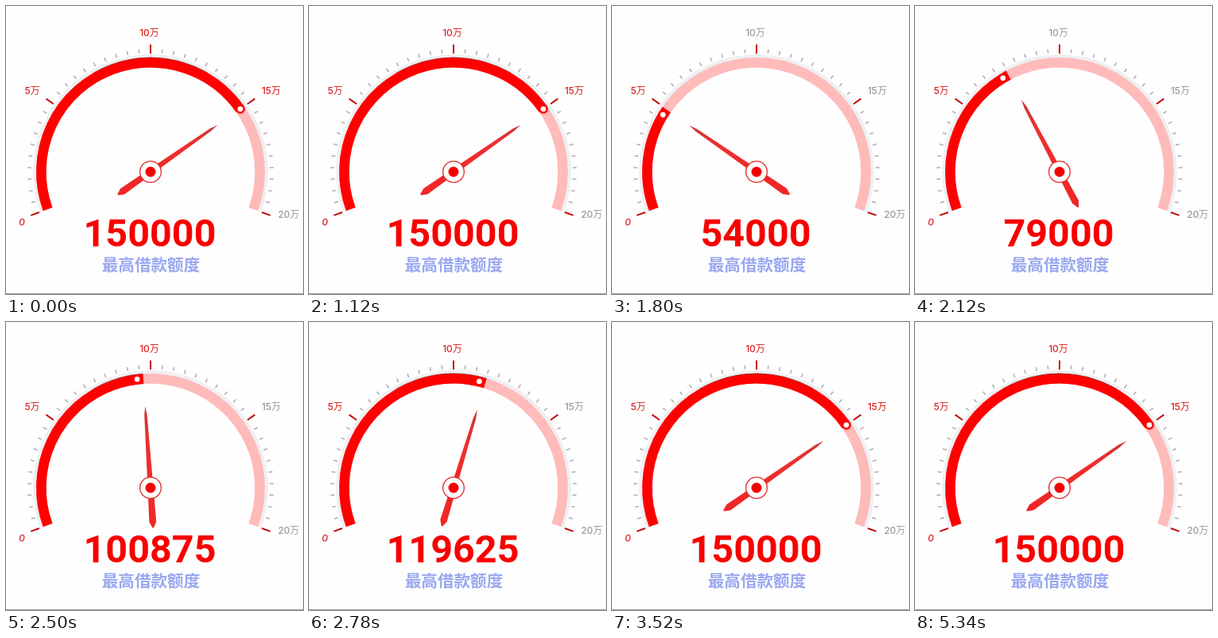
These frames come from a looping animation (374 px wide and 363 px high, 9540 ms). An HTML page with a canvas:

```html
<!DOCTYPE html>
<html lang="zh">
<head>
<meta charset="utf-8">
<style>
  html, body { margin: 0; height: 100%; overflow: hidden; background: #fff; }
  canvas { display: block; }
</style>
</head>
<body>
<canvas id="stage" width="374" height="363"></canvas>
<script>
const ctx = document.getElementById('stage').getContext('2d');
const LOOP = 9540, MAX = 200000, GOAL = 150000;
const CX = 182, CY = 209, SWEEP = 220, START = 200;
const RED = '#fe0000', GRAY = '#999';
const LABEL_FONT = '500 12px Inter, "Noto Sans CJK SC", "Noto Sans CJK", sans-serif';
const LABELS = [
  ['0', 20, 272.5, 0], ['5万', 33, 106.6, 50000], ['10万', 180.5, 34, 100000],
  ['15万', 334, 106.6, 150000], ['20万', 356, 262.5, 200000],
];

// Angles run clockwise in degrees from the start of the scale.
const rad = a => (a - START) * Math.PI / 180;
const point = (a, r) => [CX + r * Math.cos(rad(a)), CY + r * Math.sin(rad(a))];

function arc(from, to, r, width, color) {
  if (to <= from) return;
  ctx.beginPath();
  ctx.arc(CX, CY, r, rad(from), rad(to));
  ctx.lineWidth = width;
  ctx.strokeStyle = color;
  ctx.stroke();
}

function disc(x, y, r, color) {
  ctx.beginPath();
  ctx.arc(x, y, r, 0, 2 * Math.PI);
  ctx.fillStyle = color;
  ctx.fill();
}

function tick(a, inner, outer, width, color) {
  ctx.beginPath();
  ctx.moveTo(...point(a, inner));
  ctx.lineTo(...point(a, outer));
  ctx.lineWidth = width;
  ctx.strokeStyle = color;
  ctx.stroke();
}

function drawScale(value) {
  for (let i = 0; i <= 40; i++) {
    const a = i * SWEEP / 40;
    if (i % 10) tick(a, 150, 155, 1.7, '#b4b4b8');
    else tick(a, 149, 160.5, 2, '#c40808');
  }
  ctx.font = LABEL_FONT;
  ctx.textAlign = 'center';
  ctx.textBaseline = 'middle';
  for (const [text, x, y, limit] of LABELS) {
    ctx.save();
    ctx.translate(x, y);
    if (limit === 0) ctx.rotate(0.2);
    ctx.fillStyle = value >= limit ? '#dc2020' : GRAY;
    ctx.fillText(text, 0, 0.5);
    ctx.restore();
  }
}

function drawNeedle(a) {
  ctx.save();
  ctx.translate(CX, CY);
  ctx.rotate(rad(a));
  const shade = ctx.createLinearGradient(-50, 0, 103, 0);
  shade.addColorStop(0, '#f02626');
  shade.addColorStop(0.7, '#ee2e2e');
  shade.addColorStop(1, '#c83838');
  ctx.fillStyle = shade;
  ctx.beginPath();
  ctx.moveTo(103, 0);
  ctx.lineTo(92, 1.7);
  ctx.lineTo(-43, 4.4);
  ctx.lineTo(-50.5, 0.8);
  ctx.lineTo(-50.5, -0.8);
  ctx.lineTo(-43, -4.4);
  ctx.lineTo(92, -1.7);
  ctx.fill();
  ctx.restore();
  disc(CX, CY, 14, '#e02828');
  disc(CX, CY, 12.7, '#fff');
  disc(CX, CY, 6.5, '#f40000');
}

function drawText(value) {
  ctx.textAlign = 'center';
  ctx.textBaseline = 'alphabetic';
  ctx.font = '600 48.5px Roboto, sans-serif';
  ctx.fillStyle = '#f80000';
  ctx.fillText(value, 181, 303);
  ctx.font = '700 20.6px "Noto Sans CJK SC", "Noto Sans CJK", sans-serif';
  ctx.fillStyle = '#9aa8f0';
  ctx.fillText('最高借款额度', 182.5, 333.5);
}

// Screen updates come in an uneven 20, 100, 20 ms rhythm.
function stepAt(t) {
  const phase = t % 140;
  return 3 * Math.floor(t / 140) + (phase >= 120 ? 2 : phase >= 20 ? 1 : 0);
}

function draw(t) {
  const step = stepAt(t);
  const ramp = (delay, rate, goal) =>
    step < 25 ? goal : Math.min(goal, Math.max(0, (step - delay) * rate));
  const goalAngle = GOAL / MAX * SWEEP;
  const value = Math.round(ramp(20.72, 3125, GOAL));
  const angle = ramp(22.1, 3.4375, goalAngle);
  const dotAngle = ramp(23.05, 3.4375, goalAngle);

  ctx.fillStyle = '#fefefe';
  ctx.fillRect(0, 0, 374, 363);
  ctx.fillStyle = '#a0a0a0';
  ctx.fillRect(0, 362, 374, 1);

  arc(0, SWEEP, 145.5, 5, '#efeff1');
  arc(0, SWEEP, 137.7, 12.6, '#ffbaba');
  arc(0, angle, 137.7, 12.6, RED);
  arc(80, Math.min(angle, 140), 144.2, 0.8, 'rgba(90, 40, 40, .6)');

  const [x, y] = point(dotAngle, 138);
  disc(x, y, 6, RED);
  disc(x, y, 3.4, '#fff');

  drawScale(value);
  drawNeedle(angle);
  drawText(value);
}

const origin = performance.now();
function frame() {
  draw((performance.now() - origin) % LOOP);
  requestAnimationFrame(frame);
}
frame();
</script>
</body>
</html>
```
